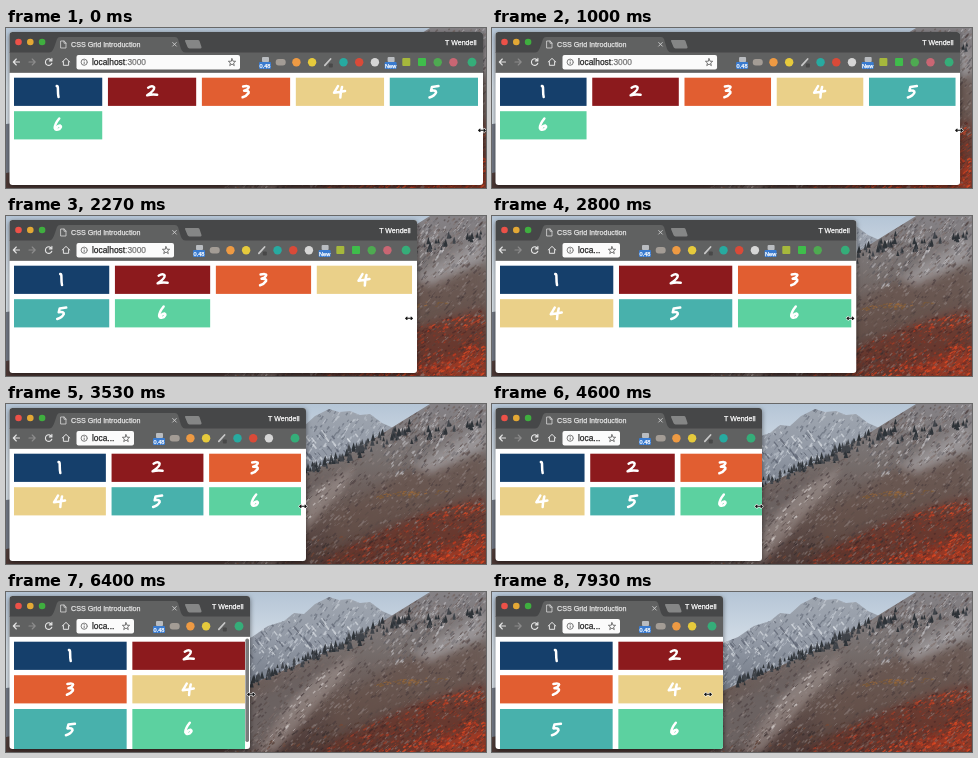
These frames come from a looping animation (480x160 px, 8000 ms). An HTML page with a canvas:

```html
<!DOCTYPE html>
<html lang="en">
<head>
<meta charset="utf-8">
<title>Responsive grid</title>
<style>
  html, body { margin: 0; width: 100%; height: 100%; overflow: hidden; background: #777; }
  canvas { display: block; width: 480px; height: 160px; }
</style>
</head>
<body>
<canvas></canvas>
<script>
const LOOP = 8000, TICK = 1000 / 15, MIN_COL = 84.4, GAP = 5.7;
const FONT = '"Liberation Sans", Arial, sans-serif';
const dpr = window.devicePixelRatio || 1;

// time, window right edge, grid right edge, pointer x
const steps = [
  [0, 477, 472, 476], [467, 477, 472, 476], [1600, 458, 454, 457],
  [2267, 411, 406, 403], [3533, 300, 295, 297], [4600, 270, 273, 267],
  [5400, 254, 250, 254], [6400, 244, 239, 245], [6867, 244, 239, 244],
  [7933, 231, 239, 216], [8000, 231, 239, 216]
];
const rows = [[49.7, 28.2], [83.2, 28.2], [117, 41]];
const tiles = [
  ['#153f6b', 'M-1-5.5Q.3-6 .2-2Q.2 3 .8 5.5'],
  ['#8c1a1d', 'M-3.5-3.8Q1-6.5 2.5-4Q3-1-4.5 3.8Q0 2.4 5.5 3.2'],
  ['#e15e31', 'M-2.5-5Q3-6 3.2-4.5Q2.5-2-1.5-.8Q4-1 3 1.5Q1 4.5-3 5.8'],
  ['#ead089', 'M-1.5-5.5Q-4-1-5.5 1.2Q0 .4 5.5-.6M2.5-4.5Q1 0 .8 6'],
  ['#48b1ac', 'M5-5.4L-1.5-4.6L-2.5-.8Q3-1.6 2.6 1Q1 4.5-4 6'],
  ['#5cd1a0', 'M1.5-6.5Q-3-1-3 3Q-2 6 1.5 4.2Q4.5 1.5 2.5.6Q.5.2-1.5 3']
].map(([color, digit]) => [color, new Path2D(digit)]);
const icons = ['badge', 'pill', '#ee9a43', '#e6ca3c', 'pen', '#27aaa0', '#d94a38',
  '#d6d6d6', 'badge', '#a6b83c', '#3fbd4b', '#4eaa51', '#c96673'];

function makeLayer() {
  const canvas = document.createElement('canvas');
  canvas.width = 480 * dpr;
  canvas.height = 160 * dpr;
  const c = canvas.getContext('2d');
  c.scale(dpr, dpr);
  return c;
}

function gradient(c, y0, y1, ...colors) {
  const g = c.createLinearGradient(0, y0, 0, y1);
  colors.forEach((color, i) => g.addColorStop(i / (colors.length - 1), color));
  return g;
}

function paintLandscape(c) {
  let seed = 17;
  const rnd = () => (seed = seed * 16807 % 2147483647) / 2147483647;
  const shape = (path, fill, blur = 0) => {
    c.filter = blur ? `blur(${blur * dpr}px)` : 'none';
    c.fillStyle = fill;
    c.fill(new Path2D(path));
    c.filter = 'none';
  };
  // Short random strokes that fill a region and lean along the slope.
  const speckle = (path, [x0, y0, x1, y1], n, size, lean, colors) => {
    c.save();
    c.clip(new Path2D(path));
    for (let i = 0; i < n; i++) {
      const x = x0 + rnd() * (x1 - x0), y = y0 + rnd() * (y1 - y0);
      const len = size * (.5 + rnd());
      c.strokeStyle = colors[Math.floor(rnd() * colors.length)];
      c.lineWidth = .6 + rnd() * 1.2;
      c.beginPath();
      c.moveTo(x, y);
      c.lineTo(x + lean * len, y + len);
      c.stroke();
    }
    c.restore();
  };
  const trees = (n, x0, x1, yAt, spread) => {
    for (let i = 0; i < n; i++) {
      const x = x0 + rnd() * (x1 - x0), y = yAt(x) + (rnd() + rnd() - 1) * spread;
      const h = 3 + rnd() * 5;
      shape(`M${x} ${y - h}l${h * .28} ${h}h${-h * .56}Z`, rnd() < .5 ? '#2e3338' : '#40444a');
    }
  };
  const far = 'M0 96L150 78L231 51L246 45L262 34L278 29L288 21L298 22L309 12L323 5L333 8L344 7L354 11L364 10L376 19L392 26L410 60V160H0Z';
  const near = 'M0 145L220 104L250 90L300 69L340 51L374 31L398 16L424 0H480V160H0Z';
  const crag = 'M372 42L424 0H480V38L430 62L390 76Z';
  const trail = 'M350 62L312 84L284 110L262 142L250 160H270L292 136L318 106L336 88Z';
  const scrub = 'M310 160Q350 138 395 118Q440 100 480 92V160Z';

  c.fillStyle = gradient(c, 0, 60, '#b5c5d6', '#d8e1e9');
  c.fillRect(0, 0, 480, 160);

  shape(far, gradient(c, 4, 95, '#9fa6b0', '#9299a5', '#747b87'));
  speckle(far, [220, 3, 400, 95], 900, 3, -.7, ['#d3d8df90', '#bcc3cc90', '#5e657290', '#737b8890']);
  speckle(far, [225, 25, 350, 62], 120, 4, .8, ['#e0e4e9a0', '#525966a0']);

  c.save();
  shape(near, gradient(c, 0, 160, '#858286', '#77706f', '#665651', '#4c3835'));
  c.clip(new Path2D(near));
  shape('M225 115L300 78L330 72L250 160H225Z', '#6b6261', 6);
  shape('M330 110L400 66L480 48V90L380 118L320 150Z', '#66514aaa', 5);
  shape(trail, '#a0959299', 3);
  shape('M405 62L480 20V44L425 70Z', '#a9a6a8aa', 4);
  shape(scrub, '#6e3429c0', 4);
  shape('M400 162Q440 142 480 132V162Z', '#b93b20a0', 4);
  speckle(near, [220, 0, 480, 160], 2300, 2.4, -1, ['#42373880', '#93888680', '#594a4780', '#7c6d6880']);
  speckle(crag, [370, 0, 480, 76], 450, 3, -.8, ['#b9b7bb90', '#55535990', '#d2d1d580', '#77737790']);
  speckle(trail, [250, 62, 350, 160], 170, 2.6, -1, ['#d9d3d190', '#b7aeab90']);
  speckle('M225 160Q290 126 410 128L350 160Z', [225, 125, 410, 160], 260, 2, -1.2, ['#362b2ba0', '#50382fa0', '#7a4933a0']);
  speckle(scrub, [310, 92, 480, 160], 900, 1.7, -1.5, ['#8c3524a0', '#ad3e25a0', '#4d2926b0', '#5b362eb0']);
  speckle('M372 160Q425 137 480 126V160Z', [372, 126, 480, 160], 330, 1.5, -1.5, ['#df4b25c0', '#c93c1fc0', '#7a2c22b0']);
  speckle('M410 117Q442 99 480 96V110Q445 112 410 122Z', [410, 96, 480, 122], 110, 1.5, -1.8, ['#d24a28c0', '#b63d23c0']);
  speckle('M368 93Q400 83 444 87Q420 95 368 95Z', [368, 83, 444, 95], 80, 1, -3, ['#a16c38b0', '#805a32b0']);
  c.restore();

  trees(85, 242, 350, x => 93 - (x - 242) * .4, 6);
  trees(60, 340, 405, x => 52 - (x - 340) * .4, 9);
  trees(28, 405, 475, x => 38 - (x - 405) * .25, 9);
}

const view = makeLayer();
const land = makeLayer();
paintLandscape(land);
document.querySelector('canvas').replaceWith(view.canvas);

function fillRound(x, y, w, h, r, color) {
  view.fillStyle = color;
  view.beginPath();
  view.roundRect(x, y, w, h, r);
  view.fill();
}

function dot(x, y, r, color) {
  view.fillStyle = color;
  view.beginPath();
  view.arc(x, y, r, 0, 7);
  view.fill();
}

function stroke(path, color, width = 1, x = 0, y = 0) {
  view.save();
  view.translate(x, y);
  view.strokeStyle = color;
  view.lineWidth = width;
  view.lineCap = view.lineJoin = 'round';
  view.stroke(path instanceof Path2D ? path : new Path2D(path));
  view.restore();
}

function text(str, x, y, size, color, align = 'left') {
  view.font = `${size}px ${FONT}`;
  view.textAlign = align;
  view.fillStyle = view.strokeStyle = color;
  view.lineWidth = .25;
  view.fillText(str, x, y);
  view.strokeText(str, x, y);
}

function drawTabs(right) {
  const tabEnd = Math.min(178, right - 59);
  view.fillStyle = '#606161';
  view.fill(new Path2D(`M43 25Q47 24 49 17L51 11Q52 9 54 9H${tabEnd - 9}Q${tabEnd - 7} 9 ${tabEnd - 6} 11L${tabEnd - 3} 21Q${tabEnd - 1} 25 ${tabEnd + 2} 25Z`));
  view.fillStyle = '#858686';
  view.fill(new Path2D(`M${tabEnd + 2} 12h12q1 0 1.5 1l2 6q.4 1.4-1 1.4h-11q-1.5 0-2-1.4l-2.5-6q-.4-1 1-1Z`));
  ['#ec5148', '#e3a835', '#3fae3f'].forEach((color, i) => dot(12.5 + i * 11.8, 14, 3.3, color));
  stroke('M55 13H58.2L60 15V20H55ZM58 13V15.2H60', '#d8d8d8', .8);
  text('CSS Grid Introduction', 65, 18.7, 7.15, '#e6e6e6');
  stroke('M-1.8-1.8L1.8 1.8M1.8-1.8L-1.8 1.8', '#d0d0d0', .9, tabEnd - 9.5, 16.3);
  text('T Wendell', right - 6.5, 16.8, 7, '#fff', 'right');
}

function drawAddress(end) {
  stroke('M13.5 34H7.5M10.3 31L7.3 34L10.3 37', '#e4e4e4', 1.1);
  stroke('M23 34H29M26.2 31L29.2 34L26.2 37', '#8c8c8c', 1.1);
  stroke('M45.6 32.5A3.3 3.3 0 1 0 45.8 35.3M45.9 30.4V32.9H43.4', '#e4e4e4', 1.1);
  stroke('M56.2 34L60 30.4L63.8 34M57.4 33.6V37.3H62.6V33.6', '#e4e4e4', 1);
  fillRound(70.5, 27, end - 70.5, 14.5, 2, '#fbfbfb');
  stroke('M81.3 34.2A3.1 3.1 0 1 1 75.1 34.2A3.1 3.1 0 1 1 81.3 34.2M78.2 34V35.8M78.2 32.4V32.5', '#5c5c5c', .8);

  const host = 'localhost', url = host + ':3000';
  view.font = `8.4px ${FONT}`;
  let shown = url;
  for (let n = url.length; n && view.measureText(shown).width > end - 104.7; n--) {
    shown = url.slice(0, n - 1) + '...';
  }
  if (shown === url) {
    const hostWidth = view.measureText(host).width;
    text(host, 86, 37.1, 8.4, '#272727');
    text(':3000', 86 + hostWidth, 37.1, 8.4, '#777');
  } else {
    text(shown, 86, 37.1, 8.4, '#272727');
  }
  stroke('M0-3.6L1-1.1L3.6-1L1.6.7L2.3 3.3L0 1.8L-2.3 3.3L-1.6.7L-3.6-1L-1-1.1Z', '#555', .8, end - 8, 34.3);
}

function drawIcons(start, right) {
  const last = right - 11;
  icons.forEach((icon, i) => {
    const x = start + i * 15.7;
    if (x > last - 12.5) return;
    if (icon === 'badge') {
      fillRound(x - 3, 29, 7, 5, 1, '#b9bcc0');
      fillRound(x - 6, 34, 12, 7, 1, '#397bd0');
      text(i ? 'New' : '0.48', x, 39.6, 5.6, '#fff', 'center');
    } else if (icon === 'pill') {
      fillRound(x - 5, 31, 10, 6.4, 3, '#a39c95');
    } else if (icon === 'pen') {
      stroke('M-3 3.4L2.8-3', '#c8c8c8', 1.7, x, 34);
      fillRound(x + 1, 35.5, 4, 4, .8, '#484848');
    } else if (i === 9 || i === 10) {
      fillRound(x - 4, 30, 8, 8, 1, icon);
    } else {
      dot(x, 34.2, 4.2, icon);
    }
  });
  dot(last, 34.2, 4.4, '#35ad79');
}

function drawGrid(gridEnd) {
  const width = gridEnd - 8;
  const columns = Math.floor((width + GAP) / (MIN_COL + GAP));
  const pitch = (width + GAP) / columns;
  tiles.forEach(([color, digit], i) => {
    const x = 8 + (i % columns) * pitch, [y, height] = rows[Math.floor(i / columns)];
    view.fillStyle = color;
    view.fillRect(x, y, pitch - GAP, height);
    stroke(digit, '#fff', 2.5, x + (pitch - GAP) / 2 - .4, y + height / 2 - .3);
  });
  if (columns === 2) fillRound(gridEnd + .4, 46.5, 3.6, 103.5, 1.7, '#7b7b7b');
}

function drawPointer(x) {
  const arrow = 'M-3.2 0H3.2M-2-1.2L-3.4 0L-2 1.2M2-1.2L3.4 0L2 1.2';
  stroke(arrow, '#fff', 2.2, x, 102.3);
  stroke(arrow, '#111', 1.1, x, 102.3);
}

function stateAt(time) {
  const i = Math.max(1, steps.findIndex(step => step[0] >= time));
  const a = steps[i - 1], b = steps[i];
  const p = (time - a[0]) / (b[0] - a[0]);
  return a.map((v, k) => v + (b[k] - v) * p).slice(1);
}

function render(now) {
  const tick = Math.floor((now % LOOP + 5) / TICK) % 120;
  const [right, gridEnd, pointer] = stateAt(tick * TICK);
  const urlEnd = Math.max(128, right - 243);
  view.drawImage(land.canvas, 0, 0, 480, 160);

  view.save();
  view.shadowColor = '#0008';
  view.shadowBlur = 5 * dpr;
  view.shadowOffsetY = 1.5 * dpr;
  fillRound(3.5, 4, right - 3.5, 153, 3, '#fff');
  view.restore();

  view.save();
  view.beginPath();
  view.roundRect(3.5, 4, right - 3.5, 153, 3);
  view.clip();
  view.fillStyle = '#464748';
  view.fillRect(3, 4, 477, 21);
  view.fillStyle = '#606161';
  view.fillRect(3, 24.5, 477, 19.8);
  drawTabs(right);
  drawAddress(urlEnd);
  drawIcons(urlEnd + 25, right);
  view.fillStyle = '#444';
  view.fillRect(3, 44, 477, .6);
  drawGrid(gridEnd);
  view.restore();

  drawPointer(pointer);
}

const started = performance.now();
function loop() {
  render(performance.now() - started);
  requestAnimationFrame(loop);
}
loop();
</script>
</body>
</html>
```
